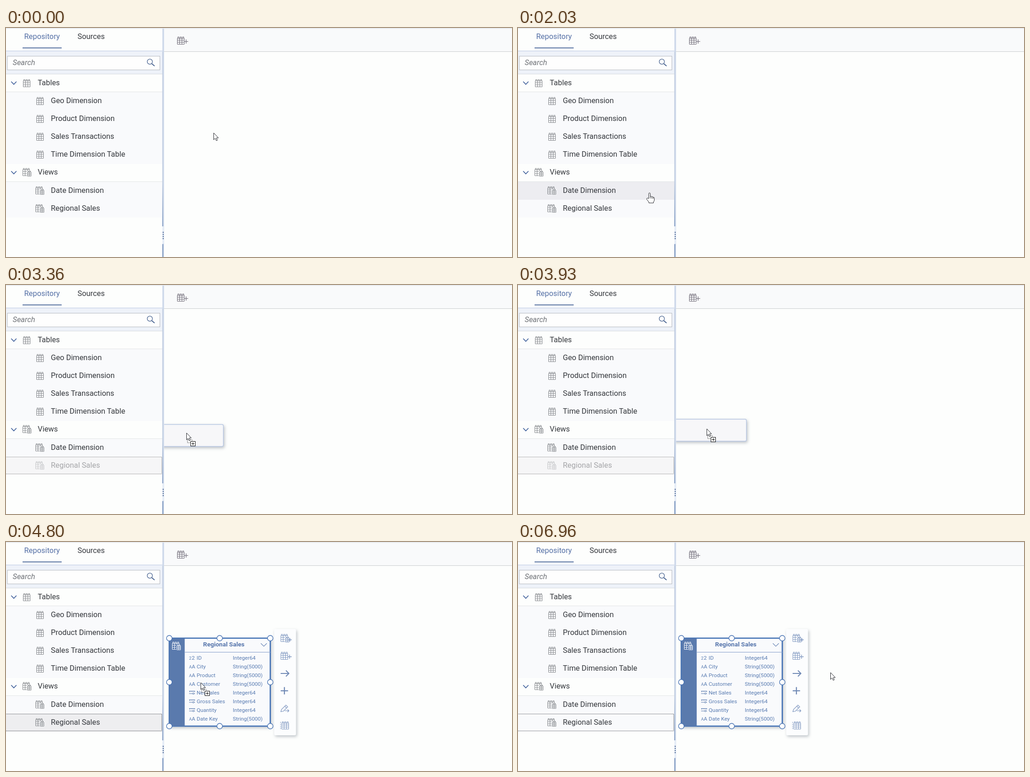
Recreate the animation shown at these times as an HTML page. Size 1100 px wide and 500 px high, loop 8000 ms.

```html
<!DOCTYPE html>
<html lang="en">
<head>
<meta charset="utf-8">
<title>Drag a view onto the canvas</title>
<style>
html, body { margin: 0; width: 100%; height: 100%; overflow: hidden; background: #fdfefd; }
svg { display: block; width: 100%; height: 100%; }
text { font: 16.35px Roboto, Arial, sans-serif; fill: #35383d; }
.hint { font-style: italic; fill: #6f7277; }
.small { font-size: 11.7px; fill: #587bb1; }
.title { font-size: 13.5px; font-weight: 700; fill: #5675ac; text-anchor: middle; }
.line { fill: none; }
.shadow { filter: drop-shadow(2px 3px 3px rgba(60, 70, 90, .32)); }
</style>
</head>
<body>
<svg id="stage" viewBox="0 0 1100 500" xmlns="http://www.w3.org/2000/svg"></svg>
<script>
const LOOP = 8000;
const stage = document.getElementById('stage');

const rect = (x, y, w, h, fill, more = '') =>
  `<rect x="${x}" y="${y}" width="${w}" height="${h}" fill="${fill}" ${more}/>`;
const text = (x, y, s, cls = '', more = '') => `<text x="${x}" y="${y}" class="${cls}" ${more}>${s}</text>`;
const line = (d, color, w = 1, more = '') =>
  `<path class="line" d="${d}" stroke="${color}" stroke-width="${w}" ${more}/>`;
const at = (x, y, body) => `<g transform="translate(${x} ${y})">${body}</g>`;

// Icons, drawn from their top left corner
const GRID = 'M.5 4.5H15.5V17.5H.5ZM.5 8.5H15.5M.5 13H15.5M5.5 4.5V17.5M10.5 4.5V17.5' +
  'M1.5 4.5V1.5H4.2V4.5M6.6 4.5V1.5H9.4V4.5M11.8 4.5V1.5H14.5V4.5';
const tableIcon = c => line(GRID, c);
const viewIcon = (c, bg) =>
  line('M10 17.5H.5V4.5H15.5V7M.5 8.5H10M.5 13H10M5.5 4.5V17.5M10.5 4.5V8' +
    'M1.5 4.5V1.5H4.2V4.5M6.6 4.5V1.5H9.4V4.5M11.8 4.5V1.5H14.5V4.5', c) +
  rect(9, 7, 11, 13, bg) +
  line('M10.5 9.5H18.5V18.5H10.5ZM10.5 12.5H18.5M10.5 15.5H18.5M14.5 9.5V18.5M12 9.5V7.5H13.6V9.5M15.6 9.5V7.5H17.2V9.5', c);
const plus = (x, y, r, c, w) => line(`M${x - r} ${y}H${x + r}M${x} ${y - r}V${y + r}`, c, w);
const chevron = (x, y, r, h, c, w) => line(`M${x - r} ${y - h}L${x} ${y + h}L${x + r} ${y - h}`, c, w);

const GRAY = '#85888c', PANEL = '#f9fafc', PAPER = '#fdfefd', BLUE = '#5b7bae', TOOL = '#7f97c0';

const tables = ['Geo Dimension', 'Product Dimension', 'Sales Transactions', 'Time Dimension Table'];

function sidebar() {
  let s = rect(0, 0, 340, 500, PAPER) +
    text(39.5, 24.2, 'Repository', '', 'style="fill:#5570a6"') + text(155.5, 24.2, 'Sources') +
    rect(36, 42.5, 85, 2, '#54709f') +
    rect(0, 51, 340, 49, '#eef2f9') + rect(0, 49.5, 340, 1.5, '#cbd6ea') +
    rect(3, 61.5, 331.5, 30, '#fefefe', 'stroke="#b4b9c0"') + text(14.5, 81.3, 'Search', 'hint') +
    line('M317 78L323 83', '#46618f', 1.8) +
    '<circle cx="312.7" cy="73.5" r="5.6" fill="none" stroke="#46618f" stroke-width="1.3"/>' +
    rect(0, 100, 340, 1, '#d7dade') +
    rect(0, 140, 340, 157, PANEL) + rect(0, 139, 340, 1, '#e3e5e7') +
    rect(0, 336, 340, 78, PANEL) +
    rect(0, 297, 340, 38, '#ededf1', 'id="hoverViews"') +
    rect(0, 335.5, 340, 39.5, '#ededf1', 'id="hoverDate"') +
    rect(0, 375, 340, 39, '#eeeef0', 'id="hoverRegion"') +
    rect(0, 375, 340, 39, '#f6f6f7', 'id="dragRegion"') +
    rect(0, 335, 340, 1, '#e3e5e7') +
    chevron(17, 120, 5.7, 3, '#42629c', 1.8) + chevron(17, 315.5, 5.7, 3, '#42629c', 1.8) +
    at(37, 111, tableIcon(GRAY)) + text(69, 124.8, 'Tables') +
    at(36, 305, viewIcon(GRAY, PAPER)) + text(69, 320.4, 'Views');
  tables.forEach((name, i) => {
    const y = 164 + 39.15 * i;
    s += at(66, Math.round(y - 14), tableIcon(GRAY)) + text(97.5, y, name);
  });
  return s + at(64, 345, viewIcon(GRAY, PANEL)) + text(97.5, 360.2, 'Date Dimension') +
    `<g id="region">${at(64, 384, viewIcon(GRAY, PANEL))}${text(97.5, 399.3, 'Regional Sales')}</g>` +
    rect(-1, 375.5, 339.5, 37, 'none', 'id="focus" stroke-dasharray="1 1"');
}

function splitter() {
  let s = rect(340, 0, 3.5, 500, '#cdd8ea') +
    rect(339.8, 52, 1.4, 381, 'url(#fade)') + rect(340, 472, 1.6, 28, '#6484b3') +
    rect(340, 433, 3.5, 38, '#e6edf7');
  for (let i = 0; i < 4; i++) s += rect(340.6, 445 + i * 4.6, 2.2, 2.2, '#46618f');
  return s;
}

const fields = ['ID', 'City', 'Product', 'Customer', 'Net Sales', 'Gross Sales', 'Quantity', 'Date Key'];
const kinds = 'naaammma';

function fieldIcon(kind, y) {
  if (kind === 'm')
    return line(`M398 ${y - 7.5}H411M399.5 ${y - 7.5}V${y - 5}M403 ${y - 7.5}V${y - 5.5}M406.5 ${y - 7.5}V${y - 5.5}M410 ${y - 7.5}V${y - 5}`, BLUE) +
      line(`M398 ${y - 2}H405.5M409 ${y - 2}H411`, BLUE, 1.2) +
      `<circle cx="407.2" cy="${y - 2}" r="1.6" fill="none" stroke="${BLUE}"/>`;
  const c = kind === 'n' ? '2' : 'A';
  return text(398, y, c, 'small', 'style="font-size:9px"') + text(403.7, y, c, 'small');
}

function card() {
  let s = `<g class="shadow">${rect(355, 210, 219.5, 192, '#f9fafc', 'id="frame" rx="2"')}</g>` +
    rect(355.5, 210.5, 33, 191.5, '#5a7aad') + at(361, 217, viewIcon('#f4f7fc', '#5a7aad')) +
    text(473.5, 228.4, 'Regional Sales', 'title') + chevron(560.5, 224.5, 6.5, 3.2, '#6d88b8', 1.2) +
    rect(388.5, 240, 186, 1.2, '#93a8cf');
  fields.forEach((name, i) => {
    const y = 257 + i * 19;
    s += fieldIcon(kinds[i], y) + text(414.5, y, name, 'small') +
      text(493, y, kinds[i] === 'a' ? 'String(5000)' : 'Integer64', 'small');
  });
  return s;
}

function handles() {
  let s = '';
  for (const x of [355, 464.5, 574.5]) for (const y of [210, 306, 402])
    if (x !== 464.5 || y !== 306)
      s += `<circle cx="${x}" cy="${y}" r="6" fill="#fff" stroke="#4c76b5" stroke-width="1.4"/>`;
  return s;
}

function tools() {
  return `<g class="shadow">${rect(583, 190, 47.5, 232, '#fcfdfe', 'rx="3"')}</g>` +
    at(597, 200, viewIcon(TOOL, '#fcfdfe')) + plus(617.5, 213.5, 3.7, TOOL, 1.3) +
    at(597, 239, tableIcon(TOOL)) + plus(616.5, 250.5, 4.5, TOOL, 1.3) +
    line('M597 287H615M608.5 280.5L615 287L608.5 293.5', '#6f89b5', 2) +
    plus(605.2, 324.8, 8, '#6f89b5', 2.3) +
    line('M597.5 370.5L599 365.5L608.5 356L612.5 360L603 369.5ZM606 358.5L610 362.5M606 368.5H615M612 365.5L615 368.5L612 371.5', TOOL, 1.2) +
    at(599, 391, tableIcon(TOOL)) + line('M597 393V410', TOOL, 1.6, 'stroke-dasharray="1.6 2.6"');
}

const outline = (d, id) => `<path id="${id}" d="${d}" fill="#fff" stroke="#25272c" stroke-linejoin="round"/>`;
const cursor = () => '<g id="cursor">' +
  rect(2.5, 14.5, 10, 7, '#fff', 'id="badge" rx="1" stroke="#333" stroke-width="1.2"') +
  outline('M.5 0V15L3.8 11.8L6.2 17L8.6 16L6.3 11H10.8Z', 'arrow') +
  outline('M-1.8 12.5V1.8A1.7 1.7 0 0 1 1.6 1.8V7.8Q3.6 6.6 4.8 8.4Q6.9 7.4 7.8 9.5Q10.4 9 10.4 11.8V15Q10.4 18 8.5 20V22H-1.5V20L-5.8 14.6Q-7.2 12 -5 11.3Q-3 11.3 -1.8 12.5ZM1.6 8V12M4.8 8.5V12.5M7.8 9.5V13', 'hand') +
  `<g id="plus">${rect(9.5, 18.5, 10, 10, '#fff', 'stroke="#111"')}${plus(14.5, 23.5, 3, '#111', 1.1)}</g></g>`;

stage.innerHTML =
  '<defs><linearGradient id="fade" x2="0" y2="1"><stop offset="0" stop-color="#bfcade"/>' +
  '<stop offset=".75" stop-color="#bccade"/><stop offset="1" stop-color="#6585b4"/></linearGradient>' +
  '<clipPath id="area"><rect x="343.5" y="52" width="757" height="448"/></clipPath></defs>' +
  rect(0, 0, 1100, 500, PAPER) + rect(343, 0, 757, 51, '#f9fafb') + rect(343, 51, 757, 1, '#c9cccf') +
  at(372, 18, tableIcon('#6b6673')) + plus(391.5, 29.5, 4.6, '#6b6673', 1.2) +
  sidebar() +
  '<g clip-path="url(#area)">' +
  `<g id="ghost" class="shadow">${rect(-80, -24, 160, 48, '#f7f7f9', 'rx="3" stroke="#b6c6e2" stroke-width="1.4"')}</g>` +
  `<g id="card">${card()}<g id="handles">${handles()}</g></g>` +
  line('M435.5 258V441', '#e3b695', 2.2, 'id="guide" stroke-dasharray="6 3"') +
  `<g id="tools">${tools()}</g></g>` +
  splitter() + rect(0, 0, 1100, 1.5, '#e4e8ed') + cursor();

const el = {};
stage.querySelectorAll('[id]').forEach(n => el[n.id] = n);

const clamp = v => Math.max(0, Math.min(1, v));
const ease = p => p < .5 ? 2 * p * p : 1 - 2 * (1 - p) ** 2;
const phase = (t, start, length) => clamp((t - start) / length);
const show = (n, on) => n.style.display = on ? '' : 'none';
const move = (n, x, y) => n.setAttribute('transform', `translate(${x} ${y})`);

// Pointer path: start time and where each move ends; bow lifts the middle
const MOVE = 790;
const moves = [[1470, 253, 386, 0], [2670, 397, 321, 0], [3540, 423, 307, 0], [6170, 679, 285, 6]];

function pointer(t) {
  let x = 451, y = 229;
  for (const [start, toX, toY, bow] of moves) {
    if (t < start) break;
    const p = ease(phase(t, start, MOVE));
    x += (toX - x) * p;
    y += (toY - y) * p - bow * 4 * p * (1 - p);
  }
  return [x, y];
}

function render(t) {
  const [x, y] = pointer(t);
  const drag = t >= 2660 && t < 4360;
  const dropped = t >= 4360;
  const inList = t < 2660 && x < 340;
  const hand = inList && t < 2300;
  const grabbing = t >= 2300 && t < 6160;
  const overCanvas = grabbing && x > 343;

  // Pointers sit on whole pixels
  move(el.cursor, Math.round(x), Math.round(y));
  show(el.hand, hand);
  show(el.arrow, !hand);
  show(el.badge, grabbing);
  el.badge.setAttribute('stroke-dasharray', overCanvas ? '1 1' : 'none');
  show(el.plus, overCanvas);

  show(el.hoverViews, inList && y >= 297 && y < 335.5);
  show(el.hoverDate, inList && y >= 335.5 && y < 375);
  show(el.hoverRegion, inList && y >= 375 || dropped && t < 6160);
  show(el.dragRegion, drag);
  el.region.style.opacity = drag ? .42 : 1;
  show(el.focus, t >= 2660);
  el.focus.setAttribute('stroke', drag ? '#777' : '#33363c');

  // The placeholder trails the pointer slightly
  const [gx, gy] = pointer(t - 90);
  move(el.ghost, gx + 12, gy);
  show(el.ghost, overCanvas && t < 4440);

  const slide = ease(phase(t, 4560, 160));
  const selected = t >= 4680;
  show(el.card, dropped);
  el.card.style.opacity = phase(t, 4330, 120);
  move(el.card, -29 * (1 - slide), 0);
  el.frame.setAttribute('stroke', selected ? '#3f6fb4' : '#5779ad');
  el.frame.setAttribute('stroke-width', selected ? 2.6 : 2);
  show(el.handles, selected);
  show(el.guide, t >= 4240 && t < 4560);
  show(el.tools, selected);
  el.tools.style.opacity = phase(t, 4660, 130);
}

const begin = performance.now();
function tick() {
  render((performance.now() - begin) % LOOP);
  requestAnimationFrame(tick);
}
tick();
</script>
</body>
</html>
```
